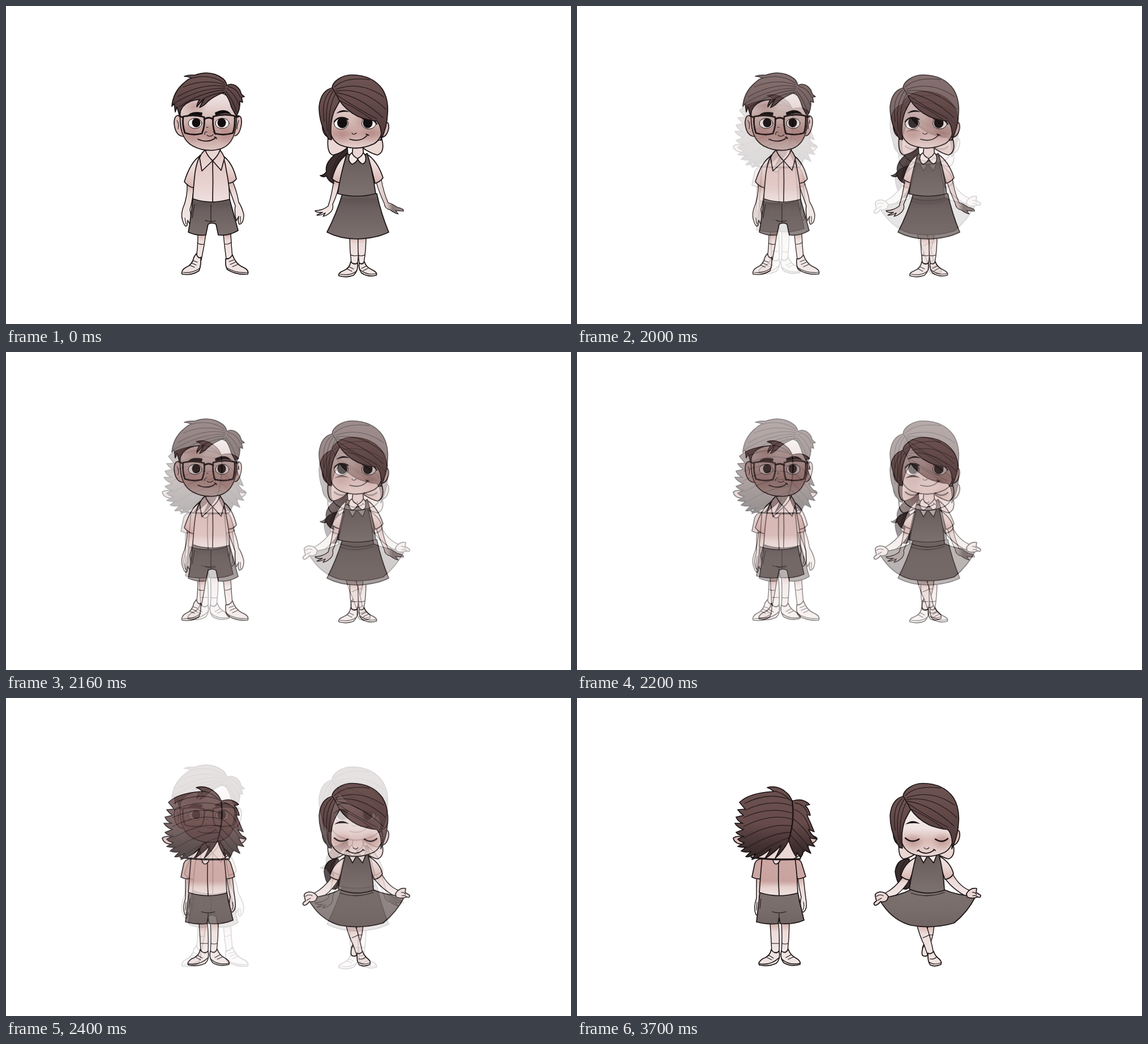
Recreate the animation shown at these times as an HTML page. Size 998x561 px, loop 4500 ms.

```html
<!DOCTYPE html>
<html lang="en">
<head>
<meta charset="utf-8">
<title>Two children</title>
<style>
  html, body { margin: 0; width: 100%; height: 100%; overflow: hidden; background: #fff; }
  svg { display: block; width: 100%; height: 100%; }
  path, ellipse { fill: none; stroke: #1b1314; stroke-width: 1.7; stroke-linecap: round; stroke-linejoin: round; }
  .hair { fill: url(#hair); }
  .bowed { fill: url(#bowed); }
  .tail { fill: #3b2e2f; }
  .strand { stroke: #291d1e; stroke-width: 1.3; }
  .skin { fill: #ead7d4; }
  .ear { fill: #d9bbb7; }
  .limb { fill: url(#limb); stroke-width: 1.4; }
  .shoe { fill: #efe3e1; }
  .shirt { fill: url(#shirt); }
  .cuff { fill: url(#cuff); }
  .shade { fill: url(#shade); }
  .sleeve { fill: #cca6a2; }
  .vest { fill: url(#vest); }
  .skirt { fill: url(#skirt); }
  .flared { fill: url(#flared); }
  .boyFace { fill: url(#boyFace); }
  .girlFace { fill: url(#girlFace); }
  .downFace { fill: url(#downFace); }
  .hand { fill: url(#hand); stroke-width: 1.1; }
  .ink { fill: #120d0e; stroke: none; }
  .white { fill: #f8f3f2; stroke-width: 1; }
  .collar { fill: #f4e9e7; }
  .thin { stroke-width: 1.1; }
  .lid { stroke-width: 2.4; }
  .rim { stroke-width: 2.8; }
  .blush { fill: url(#blush); stroke: none; }
</style>
</head>
<body>
<svg viewBox="0 0 998 561">
  <defs>
    <linearGradient id="hair" x2="0" y2="1"><stop stop-color="#6d5453"/><stop offset=".35" stop-color="#664c4b"/><stop offset="1" stop-color="#4c3838"/></linearGradient>
    <linearGradient id="bowed" x2="0" y2="1"><stop stop-color="#6b5150"/><stop offset=".5" stop-color="#664b4a"/><stop offset=".8" stop-color="#433131"/><stop offset="1" stop-color="#332727"/></linearGradient>
    <linearGradient id="limb" x2="0" y2="1"><stop stop-color="#d0aaa6"/><stop offset=".3" stop-color="#ecdcd9"/><stop offset="1" stop-color="#f2e8e6"/></linearGradient>
    <linearGradient id="shirt" x2="0" y2="1"><stop stop-color="#e1c5c1"/><stop offset=".55" stop-color="#e7d0cd"/><stop offset="1" stop-color="#eedfdd"/></linearGradient>
    <linearGradient id="cuff" x2="0" y2="1"><stop stop-color="#f0e4e2"/><stop offset=".45" stop-color="#ead8d5"/><stop offset="1" stop-color="#d5b2ae"/></linearGradient>
    <linearGradient id="shade" x2="0" y2="1"><stop stop-color="#cca8a4"/><stop offset=".62" stop-color="#c9a29e"/><stop offset=".78" stop-color="#e5d0cd"/><stop offset="1" stop-color="#f0e4e2"/></linearGradient>
    <linearGradient id="vest" x2="0" y2="1"><stop stop-color="#675c5a"/><stop offset="1" stop-color="#7d7270"/></linearGradient>
    <linearGradient id="skirt" x2="0" y2="1"><stop stop-color="#716664"/><stop offset=".13" stop-color="#5f5453"/><stop offset=".32" stop-color="#6b605f"/><stop offset="1" stop-color="#7c706f"/></linearGradient>
    <linearGradient id="flared" x2="0" y2="1"><stop stop-color="#7c716f"/><stop offset=".5" stop-color="#786d6b"/><stop offset="1" stop-color="#706563"/></linearGradient>
    <linearGradient id="boyFace" x2="0" y2="1"><stop stop-color="#f3ebea"/><stop offset=".3" stop-color="#e2cecb"/><stop offset=".62" stop-color="#c5a5a1"/><stop offset=".8" stop-color="#c7a5a1"/><stop offset="1" stop-color="#ddc6c2"/></linearGradient>
    <linearGradient id="girlFace" x2="0" y2="1"><stop stop-color="#e6d4d2"/><stop offset=".45" stop-color="#d5bbb7"/><stop offset=".72" stop-color="#c6a19c"/><stop offset="1" stop-color="#e6d2cf"/></linearGradient>
    <linearGradient id="downFace" x2="0" y2="1"><stop stop-color="#f6f0ef"/><stop offset=".45" stop-color="#efe3e1"/><stop offset=".68" stop-color="#d9bab6"/><stop offset="1" stop-color="#e9d7d4"/></linearGradient>
    <linearGradient id="hand"><stop stop-color="#eee0de"/><stop offset=".4" stop-color="#d9c4c1"/><stop offset=".6" stop-color="#857977"/><stop offset="1" stop-color="#9b8e8c"/></linearGradient>
    <radialGradient id="blush"><stop stop-color="#ae7f7b" stop-opacity=".6"/><stop offset="1" stop-color="#ae7f7b" stop-opacity="0"/></radialGradient>

    <g id="girlHair">
      <path class="hair" d="M578 144Q556 148 553 178Q553 208 570 235L575 236Q571 207 580 185Q585 175 591 165Q588 153 578 144Z"/>
      <path class="hair" d="M576 144C577 134 592 121.5 611 121.5Q648 122 665 147Q676 165 674 190Q673 215 662 237Q665 214 655 203Q640 202 622 195Q600 184 588 165Q584 156 576 144Z"/>
      <path class="strand" d="M580 143Q600 124 642 130M582 147Q626 131 667 160M583 150Q630 143 671 182M584 153Q625 159 666 197M586 158Q615 178 655 199M592 168Q620 181 646 200M575 148Q556 164 562 204M578 150Q561 174 568 221M582 155Q568 178 571 228"/>
    </g>
    <path id="girlHead" d="M572 190Q566 233 590 245Q620 257 650 243Q669 232 667 190Q660 160 620 160Q580 160 572 190Z"/>
    <g id="girlEars">
      <path class="ear" d="M567 206Q557 202 559 216Q562 230 570 231"/>
      <path class="ear" d="M668 207Q677 201 676 216Q673 230 664 232"/>
    </g>
    <g id="ribbon">
      <path class="skin" d="M569 231Q566 259 577 263Q590 261 603 250L585 236Z"/>
      <path class="skin" d="M664 235Q670 258 656 263Q642 259 630 250L655 238Z"/>
    </g>
  </defs>

  <g id="standing">
    <rect width="998" height="561" fill="#fff"/>
    <!-- boy -->
    <path class="limb" d="M339 401Q339 425 336 446L345 448Q350 424 353 402Z"/>
    <path class="limb" d="M384 403Q386 425 389 446L400 444Q398 424 397 401Z"/>
    <path class="thin" d="M338 418Q344 422 350 420M387 420Q393 421 398 417"/>
    <path class="shoe" d="M332 443Q329 457 318 461Q309 466 311 473Q328 476 341 467Q345 457 344 443Q340 447 336 437Z"/>
    <path class="shoe" d="M388 446Q387 459 391 465Q407 475 427 473Q430 466 419 461Q406 456 400 439Q394 448 388 446Z"/>
    <path class="thin" d="M313 470Q328 472 342 463M390 462Q407 472 427 470M327 453l9 4M324 457l9 4M330 449l8 3M405 452l-9 4M409 456l-9 4M402 448l-8 3"/>
    <path class="limb" d="M320 312Q321 338 312 358Q308 372 314 384Q317 391 320 387L321 378L325 386Q328 373 325 359Q330 341 332 318Z"/>
    <path class="limb" d="M391 311Q398 334 405 352Q403 366 407 379L411 371Q409 381 412 385Q420 384 420 368Q417 355 411 346Q408 327 399 306Z"/>
    <path class="thin" d="M316 374L318 385M414 371L414 382"/>
    <path class="skirt" d="M330 340Q327 372 322 399Q338 406 353 404L357 385Q364 381 371 385L375 404Q394 406 410 396Q403 370 395 341Z"/>
    <path class="thin" d="M362 350V382M352 378Q358 382 370 379M333 350Q330 365 329 374M398 353Q402 364 403 374"/>
    <path class="skin" d="M353 250L350 266L365 277L380 264L378 250Z"/>
    <path class="cuff" d="M343 264Q326 275 315 310Q322 319 332 321L337 290Z"/>
    <path class="cuff" d="M383 264Q400 276 407 305Q402 312 392 313L386 290Z"/>
    <path class="shirt" d="M343 263Q337 275 334 293Q331 320 330 340Q360 351 395 341Q395 318 389 289Q387 274 382 262L365 273Z"/>
    <path class="shirt" d="M352 254Q345 259 342 268L346 291L365 273Q355 264 352 254Z"/>
    <path class="shirt" d="M378 254Q383 260 386 268L380 290L365 273Q375 264 378 254Z"/>
    <path d="M365 273Q366 310 365 346"/>
    <path class="ear" d="M310 195Q297 188 297 207Q299 229 313 230"/>
    <path class="ear" d="M405 195Q417 189 416 207Q413 228 404 229"/>
    <path class="thin" d="M302 202Q306 207 304 217M411 202Q408 209 408 217"/>
    <path class="boyFace" d="M308 185Q304 233 330 247Q355 260 382 251Q410 239 407 186Q400 150 358 150Q315 152 308 185Z"/>
    <ellipse class="blush" cx="329" cy="224" rx="22" ry="20"/>
    <ellipse class="blush" cx="388" cy="224" rx="20" ry="20"/>
    <ellipse class="blush" cx="360" cy="222" rx="19" ry="17"/>
    <ellipse class="blush" cx="332" cy="177" rx="24" ry="17"/>
    <ellipse class="white" cx="334" cy="207" rx="12" ry="9"/>
    <ellipse class="white" cx="382" cy="207" rx="12" ry="9"/>
    <ellipse class="ink" cx="336" cy="206" rx="7.5" ry="8"/>
    <ellipse class="ink" cx="381" cy="206" rx="7.5" ry="8"/>
    <path class="ink" d="M319 196Q325 184 347 188L346 194Q333 190 319 196ZM369 188Q388 178 398 191Q384 187 370 193Z"/>
    <path class="thin" d="M351 227Q350 222 355 222M355 228Q361 232 366 227M366 222Q371 223 370 227M354 214L357 214"/>
    <path d="M339 235Q357 243 371 232M368 231Q371 231 372 234"/>
    <path class="rim" d="M313 195Q332 191 350 196Q352 211 346 225Q331 229 316 224Q311 209 313 195ZM366 195Q385 189 404 194Q405 211 401 224Q386 229 369 225Q364 210 366 195ZM350 200Q358 194 366 200M313 197L306 194M404 196L411 195"/>
    <path class="hair" d="M306 192L302 178L299 187L297 172L293 177Q295 152 314 136Q321 129 328 127Q320 124 315 124Q324 121 333 122Q362 112 383 128Q389 133 390 140Q403 134 413 148L416 156L421 160L416 161L418 170L413 168Q414 182 407 194Q402 186 398 178Q394 162 385 152Q366 160 357 168Q350 176 342 179Q345 172 350 164Q343 170 337 178Q337 172 342 165Q322 166 312 178Q308 184 306 192Z"/>
    <path class="strand" d="M329 127Q360 119 386 136M387 139Q350 127 313 143M387 142Q348 135 303 160M387 145Q344 144 298 171M386 148Q343 152 306 178M384 152Q360 156 345 166M392 142Q408 145 414 161M390 145Q405 155 412 175M388 150Q401 165 407 187"/>

    <!-- girl -->
    <path class="limb" d="M607 405Q607 430 610 454L621 455Q624 430 622 406Z"/>
    <path class="limb" d="M622 406Q621 432 624 455L632 454Q636 430 636 405Z"/>
    <path class="thin" d="M609 439Q615 442 621 440M623 440Q628 442 634 439"/>
    <path class="shoe" d="M609 451Q607 463 596 467Q586 471 588 476Q602 480 614 475Q623 466 621 453Q615 458 609 451Z"/>
    <path class="shoe" d="M624 453Q622 463 628 471Q640 479 654 475Q657 470 646 465Q636 461 633 451Q629 458 624 453Z"/>
    <path class="thin" d="M590 473Q608 477 620 467M625 465Q638 476 654 472M603 464l8 4M606 460l8 4M639 463l-8 4M636 459l-8 4"/>
    <path class="limb" d="M579 306Q576 332 569 353Q559 361 546 361Q547 365 559 364L549 369Q555 370 564 365L560 371Q567 370 574 363Q579 357 577 350Q587 328 589 311Z"/>
    <path class="hand" d="M654 311Q660 331 668 348Q669 358 679 360Q685 365 693 367L688 361L702 362Q704 358 691 355Q681 348 675 347Q667 329 663 306Z"/>
    <path class="skirt" d="M594 332Q584 366 567 399Q590 411 620 411Q654 410 676 399Q662 365 655 331Z"/>
    <path class="tail" d="M603 250Q579 260 570 274Q564 283 566 292Q562 299 555 299Q560 303 566 300Q570 310 579 313Q577 306 583 301Q588 284 604 264Z"/>
    <path class="strand" d="M600 254Q577 272 574 304M600 260Q578 277 579 300"/>
    <use href="#ribbon"/>
    <path class="skin" d="M613 246L611 266L621 274L632 264L630 246Z"/>
    <path class="cuff" d="M602 262Q584 274 576 305Q583 311 590 312L596 282Z"/>
    <path class="cuff" d="M637 261Q656 273 666 303Q661 310 652 313L645 285Z"/>
    <path class="vest" d="M602 260Q598 275 595 286Q589 310 586 331Q620 340 653 331Q650 309 645 286Q642 273 638 260L621 271Z"/>
    <path class="collar" d="M611 259Q604 263 606 273Q610 281 614 278Q621 274 621 269Q614 266 611 259Z"/>
    <path class="collar" d="M631 259Q637 263 635 274Q631 281 627 277Q622 273 621 269Q629 265 631 259Z"/>
    <use href="#girlEars"/>
    <use class="girlFace" href="#girlHead"/>
    <path class="girlFace" d="M572 190Q566 233 590 245Q620 257 650 243Q669 232 667 190Q660 160 620 160Q580 160 572 190Z"/>
    <ellipse class="blush" cx="593" cy="227" rx="20" ry="17"/>
    <ellipse class="blush" cx="645" cy="224" rx="20" ry="17"/>
    <ellipse class="blush" cx="635" cy="202" rx="24" ry="18"/>
    <ellipse class="white" cx="592" cy="207" rx="12.5" ry="10.5"/>
    <ellipse class="white" cx="641" cy="207" rx="12.5" ry="10"/>
    <ellipse class="ink" cx="594" cy="206" rx="9" ry="9.5"/>
    <ellipse class="ink" cx="639" cy="206" rx="8.5" ry="9.5"/>
    <path class="lid" d="M580 204Q589 192 604 200M630 199Q644 193 655 208"/>
    <path class="ink" d="M583 190Q594 179 607 187Q594 185 583 190ZM626 198Q638 189 651 199Q638 196 626 198Z"/>
    <path class="thin" d="M611 224Q613 229 619 224"/>
    <path d="M607 235Q628 241 639 227M636 226L641 228"/>
    <use href="#girlHair"/>
  </g>

  <g id="bowing" opacity="0">
    <rect width="998" height="561" fill="#fff"/>
    <!-- boy -->
    <path class="limb" d="M341 397Q343 422 344 449L357 449Q358 422 356 397Z"/>
    <path class="limb" d="M361 397Q363 422 361 449L372 448Q375 422 375 396Z"/>
    <path class="thin" d="M344 433H357M362 433Q368 435 373 433"/>
    <path class="shoe" d="M343 444Q341 456 328 460Q319 466 322 471Q337 475 352 468Q360 461 357 446Q351 454 343 444Z"/>
    <path class="shoe" d="M361 446Q358 458 365 467Q378 475 394 470Q396 464 387 459Q377 454 373 443Q368 453 361 446Z"/>
    <path d="M323 469Q343 472 357 458M361 460Q375 473 394 468"/>
    <path class="thin" d="M339 454l8 5M336 458l8 4M378 453l-9 5M382 457l-9 4"/>
    <path class="limb" d="M317 316L317 353Q311 371 316 382L320 384Q324 366 322 351L326 318Z"/>
    <path class="limb" d="M390 317Q393 339 396 351Q393 363 396 375L400 378Q407 372 405 360Q403 346 400 316Z"/>
    <path class="thin" d="M318 360L317 374M400 360Q402 368 399 374"/>
    <path class="flared" d="M323 342Q320 372 317 395Q335 400 355 398L357 388L359 398Q382 400 401 392Q395 368 390 343Z"/>
    <path class="thin" d="M345 377Q357 381 369 377M357 380V398M325 354Q324 364 323 371M392 356L395 368"/>
    <path class="sleeve" d="M327 283Q316 285 314 292L309 316Q317 320 325 319Z"/>
    <path class="sleeve" d="M384 284Q395 284 397 292L404 315Q397 319 389 319Z"/>
    <path class="shade" d="M327 281Q324 313 322 343Q355 354 390 344Q389 311 385 281Z"/>
    <path d="M356 291Q355 320 357 348"/>
    <path class="ear" d="M294 246Q283 242 276 247Q278 258 294 258Z"/>
    <path class="ear" d="M408 246Q420 241 424 248Q420 258 408 257Z"/>
    <path class="skin" d="M307 267Q311 281 326 284H381Q393 282 398 265L373 246Z"/>
    <path class="skin" d="M346 284Q347 293 352 293Q358 291 359 285"/>
    <path class="rim" d="M308 281Q350 287 394 284"/>
    <path class="bowed" d="M380 182Q398 175 411 188L403 190Q410 196 412 207L406 206Q413 221 419 236L409 232Q415 243 424 249L411 247Q415 256 420 262L407 259Q409 267 413 274L401 268Q399 276 395 282L389 273L387 280Q378 267 374 251Q366 268 350 283Q357 270 360 260Q349 273 331 284Q338 275 342 266Q328 279 309 285L316 274Q306 281 298 280L307 271Q298 273 290 270L299 263Q291 264 284 262L296 255Q288 254 284 249L295 244Q286 243 281 237L294 232Q284 229 279 221L293 221Q284 218 281 210L294 207Q288 203 284 197L297 196Q292 190 287 184Q305 167 347 165Q343 160 336 158Q355 153 370 167Q377 173 380 182Z"/>
    <path class="strand" d="M347 164Q366 167 377 181M378 180Q340 164 296 186M380 190Q340 177 297 198M380 203Q340 190 294 211M381 214Q342 202 294 227M380 226Q343 219 295 247M378 237Q345 237 301 264M375 246Q345 256 314 279M385 185Q401 187 407 203M384 197Q403 203 411 231M383 214Q399 226 413 247M380 230Q395 244 409 262M377 242Q390 255 402 271"/>
    <path class="lid" d="M380 181Q385 216 374 250"/>

    <!-- girl -->
    <path class="limb" d="M620 400Q618 422 610 441L618 449Q629 426 631 400Z"/>
    <path class="shoe" d="M612 437Q608 448 610 454Q616 458 621 452L619 442Z"/>
    <path class="limb" d="M600 399Q606 422 613 435L620 455L630 451Q625 424 617 401Z"/>
    <path class="thin" d="M611 423Q617 421 622 418M622 418L629 418"/>
    <path class="shoe" d="M620 450Q619 464 624 471Q633 475 643 470Q645 464 638 459Q632 454 630 447Q625 453 620 450Z"/>
    <path class="thin" d="M622 466Q631 472 643 467M623 460Q630 462 635 457"/>
    <path class="tail" d="M587 284Q565 283 562 306Q565 330 577 337Q585 339 588 331Z"/>
    <path class="strand" d="M581 287Q565 302 576 334M586 290Q570 308 581 336"/>
    <path class="limb" d="M576 315Q562 335 545 344Q548 352 552 355Q575 343 588 319Z"/>
    <path class="limb" d="M650 318Q662 336 689 351L695 340Q675 333 663 309Z"/>
    <path class="flared" d="M590 338Q569 349 537 353Q534 358 541 366Q560 393 590 401Q628 408 666 397Q690 378 704 350Q671 348 648 338Z"/>
    <path class="strand" d="M590 344Q618 354 649 343"/>
    <path class="skin" d="M550 350Q545 342 535 342Q525 344 527 350L529 358Q521 363 527 366Q533 364 536 359Q543 361 548 356Z"/>
    <path class="skin" d="M688 345Q695 334 706 336L705 343L713 348Q714 353 708 351Q698 355 689 351Z"/>
    <path class="thin" d="M529 350Q535 345 541 349M531 357L538 353M698 343Q703 342 706 347M699 349Q704 347 708 351"/>
    <use href="#ribbon" y="21"/>
    <path class="cuff" d="M599 281Q578 291 572 314Q580 321 588 321L596 299Z"/>
    <path class="cuff" d="M640 279Q660 290 665 310Q660 319 650 320L643 300Z"/>
    <path class="vest" d="M600 275Q591 309 587 337Q617 350 649 339Q648 310 639 275Z"/>
    <path class="collar" d="M604 276L612 291L619 279ZM620 279L630 291L636 275Z"/>
    <use href="#girlEars" y="28"/>
    <path class="downFace" d="M572 219Q566 262 590 274Q620 286 650 272Q669 261 667 219Q660 189 620 189Q580 189 572 219Z"/>
    <ellipse class="blush" cx="594" cy="254" rx="20" ry="16"/>
    <ellipse class="blush" cx="645" cy="253" rx="19" ry="17"/>
    <path class="ink" d="M580 223Q592 212 606 222Q592 219 580 223ZM625 227Q637 219 651 229Q638 225 625 227Z"/>
    <path class="lid" d="M580 247Q591 257 604 249M633 249Q645 257 655 248"/>
    <path class="thin" d="M613 264Q617 269 622 264"/>
    <path d="M603 269Q617 279 631 268M601 270L604 268M630 267L633 269"/>
    <use href="#girlHair" y="29"/>
  </g>
</svg>
<script>
  const LOOP = 4500, HOLD = 2000, STEP = 100, STEPS = 6;
  const bowing = document.getElementById('bowing');
  const start = performance.now();

  // Stepped dissolve: the bowing layer is opaque, so its opacity is the mix.
  function mixAt(t) {
    return t < HOLD ? 0 : Math.min(STEPS, Math.floor((t - HOLD) / STEP) + 1) / STEPS;
  }

  function draw(now) {
    const t = Math.max(0, now - start) % LOOP;
    bowing.setAttribute('opacity', mixAt(t));
    requestAnimationFrame(draw);
  }
  draw(start);
</script>
</body>
</html>
```
